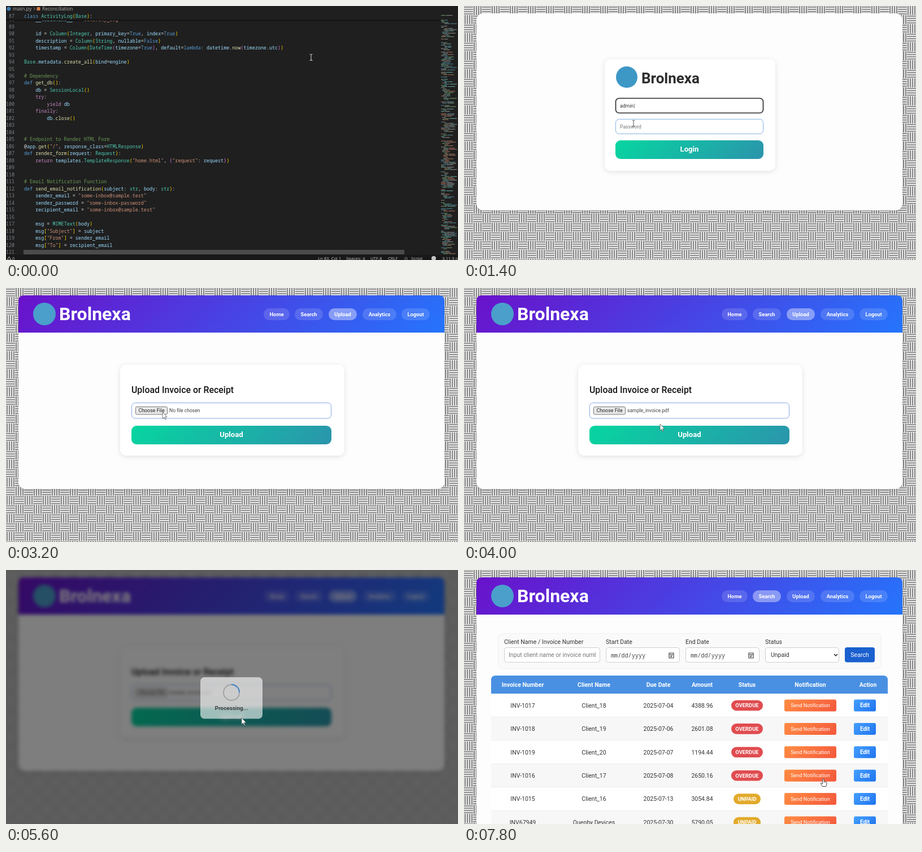
An HTML page for the animation above (8000 ms loop, 800 by 450 pixels).

```html
<!DOCTYPE html>
<html lang="en">
<head>
<meta charset="utf-8">
<title>Invoice manager demo</title>
<style>
html, body { margin: 0; width: 100%; height: 100%; overflow: hidden; background: #1f1f1f; }
svg { display: block; width: 100%; height: 100%; font-family: Roboto, sans-serif; }
text { white-space: pre; }
.mono { font-family: "Noto Sans Mono", monospace; }
.ui { font-family: "Open Sans", sans-serif; }
.soft { filter: drop-shadow(0 2px 4px rgba(0,0,0,.11)); }
</style>
</head>
<body>
<svg id="stage" viewBox="0 0 800 450"></svg>
<script>
const LOOP = 8000, STEP = 200, BRAND = 'Brolnexa';
const stage = document.getElementById('stage');
const defs = [];

// ---- drawing helpers ----
const rect = (x, y, w, h, r, fill, more = '') =>
  `<rect x="${x}" y="${y}" width="${w}" height="${h}" rx="${r}" fill="${fill}" ${more}/>`;
const text = (x, y, s, size, fill, more = '') =>
  `<text x="${x}" y="${y}" font-size="${size}" fill="${fill}" ${more}>${s}</text>`;
const MID = 'text-anchor="middle"', BOLD = 'font-weight="700"', MEDIUM = 'font-weight="500"';
const group = (id, body, more = '') => `<g id="${id}" ${more}>${body}</g>`;
const circle = (x, y, r, fill) => `<circle cx="${x}" cy="${y}" r="${r}" fill="${fill}"/>`;
const path = (d, stroke, width = 1, more = 'fill="none"') =>
  `<path d="${d}" stroke="${stroke}" stroke-width="${width}" ${more}/>`;
const roundTop = (x, y, w, h, r, fill) =>
  `<path fill="${fill}" d="M${x} ${y + h}v${r - h}q0 ${-r} ${r} ${-r}h${w - 2 * r}q${r} 0 ${r} ${r}v${h - r}z"/>`;

// Diagonal gradient at 135 degrees across a box
function diagonal(x, y, w, h, from, to) {
  const id = 'g' + defs.length, s = (w + h) / 4, cx = x + w / 2, cy = y + h / 2;
  defs.push(`<linearGradient id="${id}" gradientUnits="userSpaceOnUse" x1="${cx - s}" y1="${cy - s}" x2="${cx + s}" y2="${cy + s}">
    <stop stop-color="${from}"/><stop offset="1" stop-color="${to}"/></linearGradient>`);
  return `url(#${id})`;
}
const gradRect = (x, y, w, h, r, from, to, more) =>
  rect(x, y, w, h, r, diagonal(x, y, w, h, from, to), more);
const field = (x, y, w, h, r, stroke, width = 1) =>
  rect(x, y, w, h, r, '#fff', `stroke="${stroke}" stroke-width="${width}"`);

function random(seed) {
  return () => (seed = (seed * 16807) % 2147483647) / 2147483647;
}

// ---- code editor ----
const FIRST = 88, PITCH = 12.48;
const source = `    __tablename__ = "activity_log"

    id = Column(Integer, primary_key=True, index=True)
    description = Column(String, nullable=False)
    timestamp = Column(DateTime(timezone=True), default=lambda: datetime.now(timezone.utc))

Base.metadata.create_all(bind=engine)

# Dependency
def get_db():
    db = SessionLocal()
    try:
        yield db
    finally:
        db.close()


# Endpoint to Render HTML Form
@app.get("/", response_class=HTMLResponse)
def render_form(request: Request):
    return templates.TemplateResponse("home.html", {"request": request})


# Email Notification Function
def send_email_notification(subject: str, body: str):
    sender_email = "some-inbox@sample.test"
    sender_password = "some-inbox-password"
    recipient_email = "some-inbox@sample.test"

    msg = MIMEText(body)
    msg["Subject"] = subject
    msg["From"] = sender_email
    msg["To"] = recipient_email
`.split('\n');

const BRACKETS = ['#ffd700', '#da70d6', '#179fff'];
function wordColor(w, call) {
  if (/^(def|class|lambda|True|False)$/.test(w)) return '#569cd6';
  if (/^(return|try|yield|finally)$/.test(w)) return '#c586c0';
  if (/^([A-Z]|str$)/.test(w)) return '#4ec9b0';
  return call ? '#dcdcaa' : '#9cdcfe';
}
function highlight(line) {
  let depth = 0;
  const span = (s, c) => `<tspan fill="${c}">${s}</tspan>`;
  return line.replace(/(#.*)|("[^"]*")|(\w+)(\(?)|([()[\]{}])/g, (all, note, str, word, open, br) => {
    const bracket = b => span(b, BRACKETS['([{'.includes(b) ? depth++ % 3 : --depth % 3]);
    if (note) return span(note, '#6a9955');
    if (str) return span(str, '#ce9178');
    if (word) return span(word, wordColor(word, open)) + (open ? bracket(open) : '');
    return bracket(br);
  });
}
function codeLine(n, y, line) {
  return text(15, y, n, 8.3, '#7b8088', 'class="mono" text-anchor="end"') +
    text(32, y, highlight(line), 8.42, '#d4d4d4', `class="mono" ${MEDIUM}`);
}
function minimap() {
  const rnd = random(87), colors = ['#4f7f8f', '#6f8f6a', '#a06f58', '#5f9f94', '#8a8a8a'];
  let out = '', indent = 0;
  for (let y = 14; y < 440; y += 2.1) {
    if (rnd() < .16) { indent = 0; continue; }
    const x = 770 + indent, w = Math.min(4 + rnd() * 22, 798 - x);
    const tone = y > 236 && y < 275 ? colors[2] : colors[Math.floor(rnd() * 5)];
    out += rect(x, y, w * .4, 1.1, 0, colors[Math.floor(rnd() * 5)]) + rect(x + w * .45, y, w * .55, 1.1, 0, tone);
    indent = Math.floor(rnd() * 4) * 2;
  }
  return out;
}
function editor() {
  const ui = (x, s, size = 7.7) => text(x, 450, s, size, '#c4c4c4', 'class="ui"');
  return rect(0, 0, 800, 450, 0, '#1f1f1f') +
    source.map((l, i) => codeLine(FIRST + i, 127 + (FIRST + i - 96) * PITCH, l)).join('') +
    rect(0, 0, 768, 25, 0, '#1f1f1f') + rect(0, 24.5, 768, 1.6, 0, '#101010') +
    codeLine(87, 21, 'class ActivityLog(Base):') +
    circle(5, 5, 3.5, '#3f7fb0') + text(12, 8.4, 'main.py', 9, '#b5b5b5', 'class="ui"') +
    path('M49 2.5l2.5 2.5-2.5 2.5', '#999') + rect(54.5, 2, 6, 6, 1, '#d8824a') +
    text(64, 8.4, 'Reconciliation', 8.4, '#b5b5b5', 'class="ui"') +
    minimap() + rect(31, 432, 674, 8, 0, '#4b4b4b') +
    rect(0, 441, 800, 9, 0, '#181818') +
    path('M2 450l3.5-6 3.5 6z', '#c4c4c4') + ui(11, '0') + ui(552, 'Ln 83, Col 1') + ui(602, 'Spaces: 4') +
    ui(645, 'UTF-8') + ui(676, 'CRLF') + ui(705, '{}') + ui(717, 'Script') +
    circle(757, 447, 4, '#c4c4c4') + ui(772, '3.11.9 (c');
}

// ---- web pages ----
const TEAL = ['#06d6a0', '#2b94ac'];
const bigButton = (x, y, w, label) =>
  gradRect(x, y, w, 33, 9, ...TEAL) + text(x + w / 2, y + 20.4, label, 13.2, '#fff', `${MID} ${BOLD}`);

const login = () =>
  rect(249, 94, 302, 198, 10, '#fff', 'class="soft"') +
  circle(288, 126, 19, '#3d98c6') + text(314, 136.5, BRAND, 26, '#2d2d2d', BOLD) +
  field(268.5, 163.5, 261, 26, 6, '#25252b', 1.6) + field(268.5, 200.5, 261, 26, 6, '#86b2e4') +
  text(276, 179.6, '', 8.7, '#333', 'id="user"') + text(276, 217, '', 8.6, '#777', 'id="pass"') +
  bigButton(268, 238, 262, 'Login');

const PILLS = [['Home', 456, 46], ['Search', 511, 50], ['Upload', 571, 50], ['Analytics', 631, 60], ['Logout', 700, 50]];
const header = () =>
  roundTop(22, 13, 754, 66, 10, diagonal(22, 13, 754, 66, '#6a11cb', '#2575fc')) +
  circle(68, 46, 20, '#4a9fcb') + text(94, 57.3, BRAND, 32, '#fff', BOLD) +
  PILLS.map(([s, x, w], i) => rect(x, 36, w, 21, 10.5, '#fff', `id="pill${i}"`) +
    text(x + w / 2, 49.6, s, 9.3, '#fff', `${MID} ${BOLD}`)).join('');

function home() {
  const cards = [
    ['Overdue Invoices', '4 Invoices - $10834.64', '#f72585', '#b5179e'],
    ['Pending Invoices', '3 Invoices - $13344.89', '#f0e440', '#df9a2c'],
    ['Paid This Month', '15 Invoices - $45458.59', ...TEAL]];
  const log = [
    "New invoice added for client 'Dorvel Machines PLC' with amount $4500.0 — 7/9/2025, 6:54:01 AM",
    "New invoice added for client 'Quenby Devices' with amount $5790.05 — 7/9/2025, 12:55:42 AM",
    "Edited invoice no.6 with invoice id 'INV-1005' for client 'Client_6' — 7/5/2025, 10:09:44 PM",
    "Edited invoice no.6 with invoice id.INV-1005 for client 'Client_60' — 7/5/2025, 10:08:06 PM"];
  const white = (x, y, s, size) => text(x, y, s, size, '#fff', `${MID} ${BOLD}`);
  return cards.map(([title, sub, a, b], i) => {
    const x = 48 + i * 240.5, cx = x + 110.3;
    return gradRect(x, 99, 220.5, 108, 12, a, b, 'class="soft"') +
      white(cx, 159, title, 16.7) + white(cx, 183.6, sub, 11.1);
  }).join('') +
    circle(158, 125.5, 15, '#fff') + rect(156.2, 117, 3.8, 10.5, 1.6, '#d81f8c') + circle(158.1, 131.5, 2.3, '#d81f8c') +
    circle(398.8, 125.5, 15, '#fff') + path('M398.5 117v9l5 4', '#e5bd38', 2.8, 'fill="none" stroke-linecap="round"') +
    white(639.5, 137.5, '$', 34) +
    text(48, 251, 'Recent Activities', 19, '#222', MEDIUM) +
    rect(48.5, 269.5, 701, 181, 10, '#fafafa', 'stroke="#f0f0f0"') +
    log.map((s, i) => rect(62, 282.3 + i * 41.4, 676, 32.5, 7, '#fff', `class="soft" id="log${i}"`) +
      text(73, 301.5 + i * 41.4, s, 10.5, '#444', MEDIUM)).join('');
}

const upload = () =>
  rect(202, 136, 397, 161, 11, '#fff', 'class="soft"') +
  text(222, 186, 'Upload Invoice or Receipt', 15.9, '#151515', MEDIUM) +
  field(222.5, 203.5, 353, 27.5, 6, '#86a6e6') +
  rect(229.5, 210.5, 56, 13.5, 2, '#e9e9e9', 'stroke="#777"') +
  text(257.5, 220.3, 'Choose File', 8.9, '#222', MID) + text(289, 220.3, '', 8.6, '#444', 'id="file"') +
  bigButton(222, 244, 354, 'Upload');

function search() {
  const box = (x, w, label) => text(x, 131.3, label, 10.5, '#333') + field(x + .5, 137.5, w, 26, 4, '#cfcfcf');
  const date = (x, label) => box(x, 130, label) +
    text(x + 9, 155, 'mm/dd/yyyy', 10.2, '#444', 'class="mono"') +
    path(`M${x + 112} 147h8v9h-8zm0 2.5h8m-6 2.3h4m-4 2h3`, '#444', 1.2);
  defs.push('<clipPath id="inputClip"><rect x="75" y="138" width="158" height="25"/></clipPath>');
  return rect(60.5, 112.5, 678, 62, 8, '#fafafa', 'stroke="#f0f0f0"') +
    box(71, 169, 'Client Name / Invoice Number') +
    text(79, 154.3, 'Input client name or invoice number', 10.5, '#777', 'clip-path="url(#inputClip)"') +
    date(251, 'Start Date') + date(392, 'End Date') + box(533, 130, 'Status') +
    text(543, 154.3, '', 10.5, '#333', 'id="status"') + path('M655 149l3 3 3-3', '#222', 1.5) +
    rect(674, 137, 53, 26.5, 4, '#287bff', 'id="go"') + text(700.5, 154.2, 'Search', 10.6, '#fff', MID) +
    roundTop(48, 187, 702, 32, 8, '#4a90e2');
}
const HEADS = ['Invoice Number', 'Client Name', 'Due Date', 'Amount', 'Status', 'Notification', 'Action'];
const heads = xs => HEADS.map((s, i) => text(xs[i], 206.5, s, 10.5, '#fff', `${MID} ${BOLD}`)).join('');

const blank = () => heads([118.5, 248, 353, 442.5, 523, 617.5, 712]) +
  rect(48, 219, 702, 34, 3, '#f7f7f7', 'class="soft"') +
  text(399, 239.5, 'Please input any search field to view records.', 10.5, '#777', MID);

function results() {
  const rows = [
    ['INV-1017', 'Client_18', '07-04', '4388.96'], ['INV-1018', 'Client_19', '07-06', '2601.08'],
    ['INV-1019', 'Client_20', '07-07', '1194.44'], ['INV-1016', 'Client_17', '07-08', '2650.16'],
    ['INV-1015', 'Client_16', '07-13', '3054.84'], ['INV67949', 'Quenby Devices', '07-30', '5790.05']];
  return heads([104, 230, 344, 421.5, 501, 613, 715]) + rows.map(([id, client, due, sum], i) => {
    const y = 240 + i * 41.4, late = i < 4, w = late ? 56 : 48;
    const cell = (x, s) => text(x, y + 3.7, s, 10.5, '#333', MID);
    return rect(48, y - 20.7, 702, 41.4, 0, i % 2 ? '#f7f7f7' : '#fff') + rect(48, y + 20.2, 702, 1, 0, '#e2e2e2') +
      cell(104, id) + cell(230, client) + cell(344, '2025-' + due) + cell(421.5, sum) +
      rect(501 - w / 2, y - 9.3, w, 18.6, 9.3, late ? '#e04c4f' : '#e2aa2b') +
      text(501, y + 3.3, late ? 'OVERDUE' : 'UNPAID', 9.4, '#fff', `${MID} ${BOLD}`) +
      gradRect(567, y - 10.5, 92, 21, 3, '#ff8c42', '#f4583c') + text(613, y + 3.2, 'Send Notification', 9.1, '#fff', MID) +
      gradRect(690, y - 10.5, 39, 21, 3, '#45a0ff', '#1f73ee') + text(709.5, y + 3.4, 'Edit', 10, '#fff', `${MID} ${BOLD}`);
  }).join('');
}

// Basket weave: alternating blocks of four lines
function weave(block = 16) {
  const gap = block / 4;
  let d = '';
  for (let p = gap / 2; p < block; p += gap) {
    d += `M0 ${p}h${block}M${block} ${p + block}h${block}M${p + block} 0v${block}M${p} ${block}v${block}`;
  }
  defs.push(`<pattern id="weave" width="${2 * block}" height="${2 * block}" patternUnits="userSpaceOnUse">
    ${rect(0, 0, 2 * block, 2 * block, 0, '#e8e8e8')}${path(d, '#767676', 1.7)}</pattern>`);
  return rect(-32, -64, 864, 640, 0, 'url(#weave)');
}

const overlay = () => rect(0, 0, 800, 450, 0, 'rgba(0,0,0,.5)') +
  rect(344, 190, 110, 73.5, 7, 'rgba(255,255,255,.6)') +
  '<circle cx="399" cy="217" r="14" fill="none" stroke="#a2a2a2" stroke-width="2"/>' +
  path('M399 203a14 14 0 0 1 14 14', '#3f86cc', 2, 'fill="none" id="spin"') +
  text(399, 248, 'Processing...', 9.9, '#3a3a3a', `${MID} ${BOLD}`);

const pointers = () =>
  group('arrow', path('M0 0V11.5l2.7-2.5 1.8 4 1.7-.8-1.8-3.8H8z', '#555', .8, 'fill="#fff"')) +
  group('beam', path('M-2.5-5.5q2.5 0 2.5 1.5V4q0 1.5-2.5 1.5M2.5-5.5Q0-5.5 0-4V4q0 1.5 2.5 1.5', 'currentColor', 1.1)) +
  group('hand', path('M-1.2 1.2a1.2 1.2 0 0 1 2.4 0V5l4 1q1.2.4 1 1.8L5.5 11l-1 2.5h-6L-4.5 9q-.8-1.5.6-1.6l2.7 1.1z', '#333', .9, 'fill="#fff"'));

const body = group('code', editor()) +
  group('web', rect(0, 0, 800, 450, 0, '#b8b8b8') + group('blurred', group('scroll',
    weave() + rect(22, 13, 754, 349, 12, '#fdfdfd', 'id="card" class="soft"') +
    group('login', login()) + group('header', header()) + group('home', home()) + group('upload', upload()) +
    group('search', search() + group('blank', blank()) + group('results', results())))) +
    group('tip', rect(0, 438, 22, 12, 0, '#1d1d1d') + text(-2, 447, '000/#', 7.6, '#ddd')) +
    group('overlay', overlay())) +
  group('pointer', pointers());
stage.innerHTML = `<defs>${defs.join('')}</defs>${body}`;

// ---- timeline ----
const el = id => document.getElementById(id);
const show = (id, on) => { el(id).style.display = on ? '' : 'none'; };
const set = (id, s) => { el(id).textContent = s; };
const clamp = v => Math.max(0, Math.min(1, v));
const ramp = (t, a, b) => clamp((t - a) / (b - a));

const SCENES = [[0, 'code'], [800, 'login'], [2000, 'home'], [3000, 'upload'], [6400, 'search']];
const HEIGHTS = { login: 349, home: 457, upload: 343, search: 259 };
// time, x, y, pointer shape
const MOVES = [
  [0, 540, 91, 'beam'], [800, 400, 176, 'beam'], [1000, 400, 176, 'beam'], [1400, 300, 208, 'beam'],
  [1600, 300, 208, 'beam'], [1800, 399, 255, 'hand'], [2000, 402, 262, 'arrow'], [2400, 416, 293, 'arrow'],
  [2600, 416, 293, 'arrow'], [2800, 597, 16, 'hand'], [3000, 597, 16, 'arrow'], [3200, 277, 220, 'arrow'],
  [3800, 277, 220, 'arrow'], [4200, 417, 262, 'arrow'], [5800, 417, 262, 'arrow'], [6200, 533, 51, 'hand'],
  [6600, 533, 51, 'hand'], [6800, 600, 150, 'arrow'], [7000, 600, 150, 'arrow'], [7200, 700, 151, 'hand'],
  [7400, 700, 151, 'hand'], [7800, 636, 370, 'hand'], [8000, 636, 370, 'hand']];

function movePointer(t, scene) {
  const i = MOVES.findIndex(m => m[0] > t) - 1;
  const [t0, x0, y0, shape] = MOVES[i], [t1, x1, y1] = MOVES[i + 1];
  const k = scene === 'code' ? 0 : ramp(t, t0, t1);
  el('pointer').setAttribute('transform', `translate(${x0 + (x1 - x0) * k} ${y0 + (y1 - y0) * k})`);
  el('pointer').style.color = scene === 'code' ? '#ccc' : '#666';
  for (const s of ['arrow', 'beam', 'hand']) show(s, s === shape);
}

function render(t) {
  const scene = SCENES.filter(s => s[0] <= t).pop()[1];
  const busy = t >= 4400 && t < 5800, found = t >= 7200;
  for (const [, s] of SCENES) show(s, s === scene);
  show('web', scene !== 'code');
  show('header', scene !== 'code' && scene !== 'login');
  show('blank', !found);
  show('results', found);
  show('overlay', busy);
  show('tip', t >= 6200 && t < 6800);
  el('blurred').style.filter = busy ? 'blur(3px)' : '';
  el('card').setAttribute('height', found ? 600 : HEIGHTS[scene] || 0);

  const down = scene === 'home' ? 32 * ramp(t, 2400, 2600) : 0;
  el('scroll').setAttribute('transform', `translate(0 ${-down})`);
  el('log0').setAttribute('fill', t >= 2400 && t < 2800 ? '#dfe6ef' : '#fff');

  const active = { home: 0, search: 1, upload: 2 }[scene];
  PILLS.forEach((p, i) => el('pill' + i).setAttribute('fill-opacity', i === active ? .4 : .14));

  const caret = t < 1600 ? '|' : '';
  set('user', 'admin'.slice(0, Math.round(5 * ramp(t, 800, 1400))) + caret);
  set('pass', t < 1600 ? 'Password' : '•'.repeat(t < 1800 ? 3 : 5));
  set('file', t < 3800 ? 'No file chosen' : 'sample_invoice.pdf');
  set('status', t < 7000 ? 'All' : 'Unpaid');
  el('go').setAttribute('fill', found ? '#1b60cf' : '#287bff');
  el('spin').setAttribute('transform', `rotate(${(t - 4600) * .36} 399 217)`);
  movePointer(t, scene);
}

const start = performance.now();
let last = -1;
function tick(now) {
  const t = Math.floor(Math.max(0, now - start) % LOOP / STEP) * STEP;
  if (t !== last) render(last = t);
  requestAnimationFrame(tick);
}
render(0);
requestAnimationFrame(tick);
</script>
</body>
</html>
```
